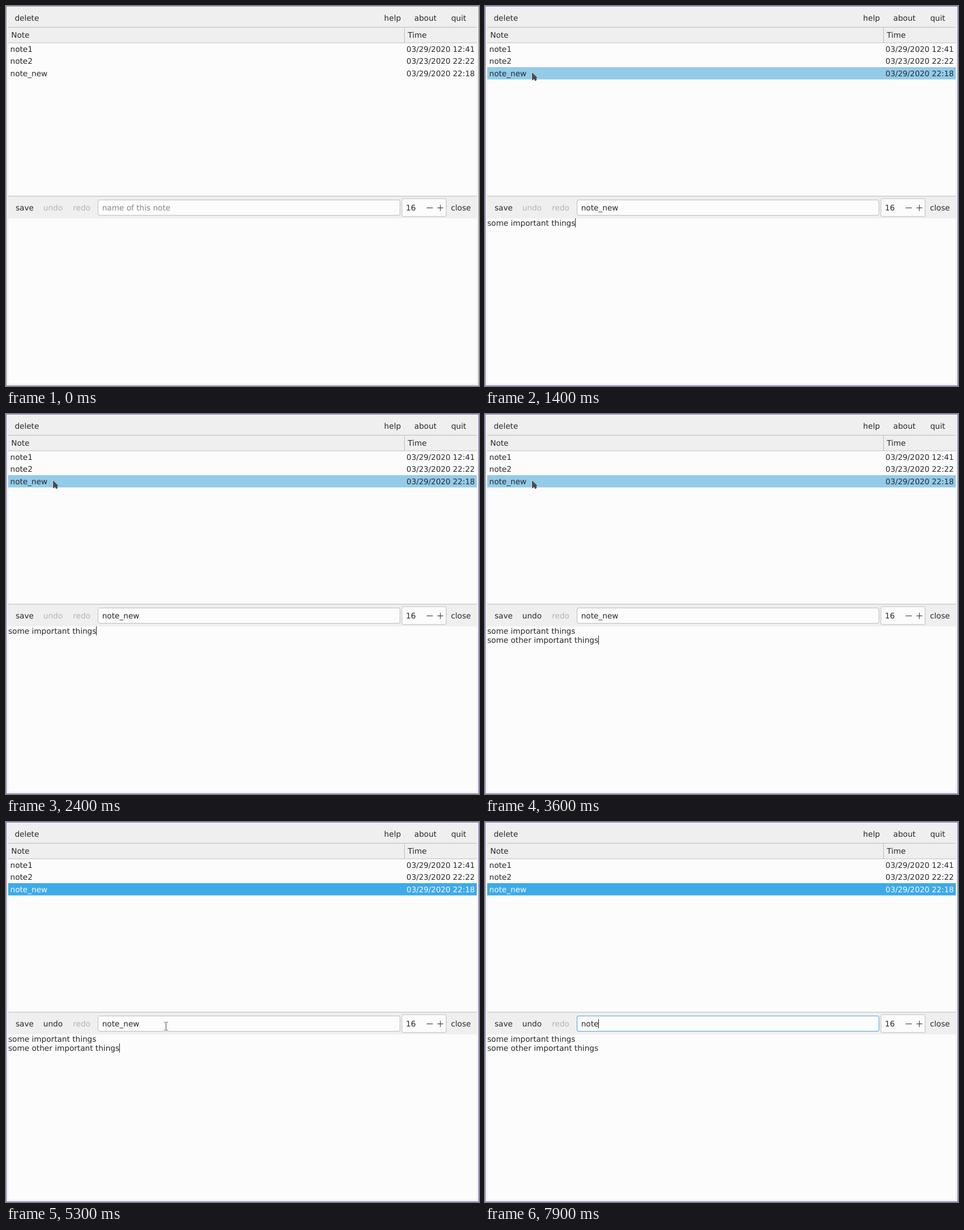
Recreate the animation shown at these times as an HTML page. Size 835x671 px, loop 8 s.

```html
<!DOCTYPE html>
<html lang="en">
<head>
<meta charset="utf-8">
<title>Notes</title>
<style>
  html, body { margin: 0; width: 100%; height: 100%; overflow: hidden; background: #efeff0; }
  svg { display: block; width: 835px; height: 671px; }
  text { font: 13.65px "DejaVu Sans", sans-serif; fill: #26292c; white-space: pre; text-rendering: geometricPrecision; }
  .off { fill: #b2b3b4; }
  .date { font-size: 13.45px; }
  .page { fill: #fcfcfc; }
  .line { stroke: #bcbdbe; fill: none; }
  .box { stroke: #bcbdbe; fill: #fcfcfc; }
  .caret { stroke: #26292c; }
</style>
</head>
<body>
<svg viewBox="0 0 835 671">
  <rect width="835" height="671" fill="#efeff0"/>
  <rect class="page" x="4" y="65" width="827" height="270"/>
  <rect class="page" x="4" y="375" width="827" height="292"/>
  <path class="line" d="M4 37.5H831M4 65H831M4 335.8H831M703.5 38V65"/>
  <rect id="row" x="4" y="108" width="827" height="21.6"/>
  <rect id="field" class="box" x="162.5" y="342.5" width="533" height="27" rx="2.5"/>
  <rect class="box" x="699" y="340.2" width="78" height="31.5" rx="2.5"/>
  <path d="M742.5 356.5H753.5M761.5 356.5H772M766.8 351V362" stroke="#26292c"/>
  <g id="labels"></g>
  <text id="name" x="169.7" y="361"></text>
  <text id="line1" x="4" y="388"></text>
  <text id="line2" x="4" y="404.3"></text>
  <path id="caret" class="caret"/>
  <rect id="frame" x=".5" y=".5" width="834" height="670" fill="none"/>
  <path id="arrow" d="M0 0V14.5L3.5 12L5.5 15.5L8.5 13.5L7.5 11L9.5 9.5Z" fill="#4a4c4f" stroke="#fcfcfc" paint-order="stroke"/>
  <path id="beam" d="M-3 -6.5H-1L0 -5.5L1 -6.5H3M-3 7.5H-1L0 6.5L1 7.5H3M0 -5.5V6.5" fill="none" stroke="#3c3f42"/>
</svg>
<script>
const $ = id => document.getElementById(id);
const set = (id, attrs) => { for (const k in attrs) $(id).setAttribute(k, attrs[k]); };
const show = (id, on) => { $(id).style.display = on ? "" : "none"; };

function label(x, y, str, cls = "") {
  const el = document.createElementNS("http://www.w3.org/2000/svg", "text");
  el.textContent = str;
  el.setAttribute("x", x);
  el.setAttribute("y", y);
  if (cls) el.setAttribute("class", cls);
  $("labels").append(el);
  return el;
}

label(15.4, 26, "delete");
label(667.6, 26, "help");
label(720.8, 26, "about");
label(785.9, 26, "quit");
label(9.2, 56, "Note");
label(709.3, 56, "Time");

const notes = [["note1", "03/29/2020 12:41"], ["note2", "03/23/2020 22:22"], ["note_new", "03/29/2020 22:18"]];
const rows = notes.map(([name, date], i) => {
  const y = 80.6 + 21.5 * i;
  return [label(7.5, y, name), label(707.1, y, date, "date")];
});

label(17, 361, "save");
const undo = label(65.8, 361, "undo");
label(118.2, 361, "redo", "off");
label(706, 361, "16");
label(785.5, 361, "close");

// pointer stops: time, x, y
const stops = [[100, 150, -20], [1200, 83, 117], [3700, 83, 117], [4100, 180, 200], [5000, 282, 360], [8000, 282, 360]];
function pointer(t) {
  let i = 0;
  while (i < stops.length - 2 && t >= stops[i + 1][0]) i++;
  const [a, b] = [stops[i], stops[i + 1]];
  const k = Math.max(0, (t - a[0]) / (b[0] - a[0]));
  return [a[1] + (b[1] - a[1]) * k, a[2] + (b[2] - a[2]) * k];
}

const erase = [6200, 6500, 6900, 7700];
const typed = "some other important things";

function draw(t) {
  const open = t >= 1400, focus = t >= 5400;
  const [x, y] = pointer(t);
  const hover = t >= 1300 && y < 130;

  set("frame", { stroke: t < 100 ? "#949596" : "#767cc0" });
  set("row", { fill: !hover ? "#3daae9" : open ? "#93cbe9" : "#d3eaf6" });
  show("row", open || hover);
  for (const el of rows[2]) el.style.fill = open && !hover ? "#fcfcfc" : "";

  const name = "note_new".slice(0, 8 - erase.filter(e => t >= e).length);
  const count = Math.round(typed.length * Math.min(1, Math.max(0, (t - 3200) / 400)));
  $("name").textContent = open ? name : "name of this note";
  $("name").style.fill = open ? "" : "#858687";
  $("line1").textContent = open ? "some important things" : "";
  $("line2").textContent = typed.slice(0, count);
  undo.setAttribute("class", t >= 2700 ? "" : "off");
  $("field").style.stroke = focus ? "#4ea5d1" : "";

  const el = $(focus ? "name" : t >= 2700 ? "line2" : "line1");
  const cx = Math.floor(+el.getAttribute("x") + el.getComputedTextLength() + .3) + .5;
  const top = Math.floor(el.getAttribute("y")) - 13;
  set("caret", { d: `M${cx} ${top}v16` });
  show("caret", t >= 100);

  const inField = y > 342;
  show("arrow", t >= 100 && !inField);
  show("beam", inField && t < 6200);
  set("arrow", { transform: `translate(${Math.round(x)} ${Math.round(y)})` });
  set("beam", { transform: `translate(${Math.round(x) + .5} ${Math.round(y)})` });
}

function tick() {
  draw(performance.now() % 8000);
  requestAnimationFrame(tick);
}
tick();
</script>
</body>
</html>
```
